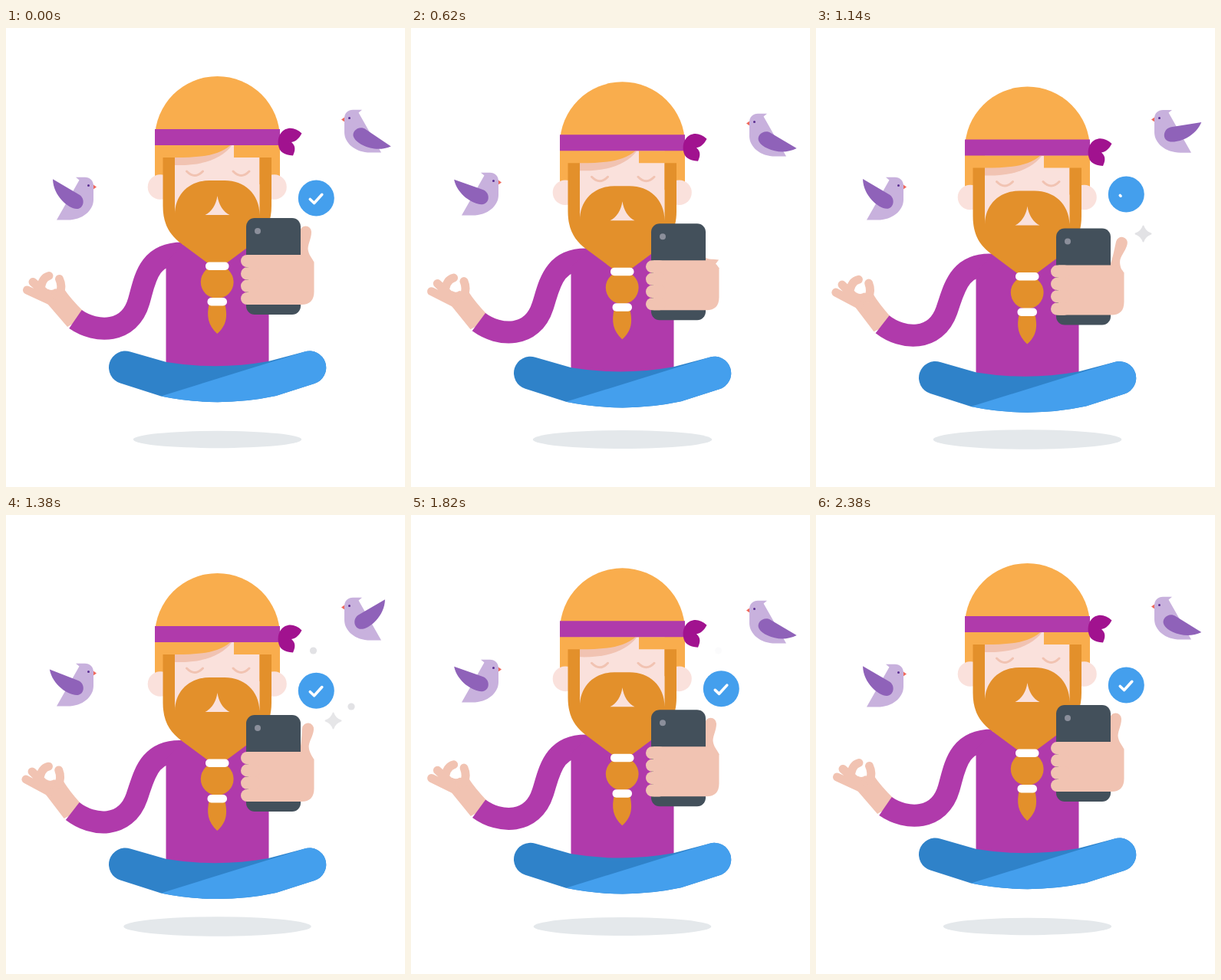
These frames come from a looping animation (520 by 599 pixels, 2.4 s). An HTML page:

```html
<!DOCTYPE html>
<html lang="en">
<head>
<meta charset="utf-8">
<title>Floating meditation</title>
<style>
  html, body { margin: 0; width: 100%; height: 100%; overflow: hidden; background: #fff; }
  svg { display: block; width: 520px; height: 599px; }
  .skin { fill: #f1c3b2; }
  .face { fill: #fae1dc; }
  .hair { fill: #f9ad4d; }
  .beard { fill: #e3902b; }
  .shirt { fill: #b03aab; }
  .white { fill: #fff; }
  .blue { fill: #449fed; }
  .line { fill: none; stroke: #f1c3b2; stroke-linecap: round; stroke-linejoin: round; }
</style>
</head>
<body>
<svg viewBox="0 0 520 599">
  <defs>
    <g id="birdBody">
      <path fill="#f0685b" d="M437 119.5L442 116V123Z"/>
      <path fill="#c8b1dd" d="M441 118C441 111 446 106.8 452 106.8H464L459.5 110.5L489 162.6H475C455 162.6 441 150 441 136Z"/>
      <circle cx="447.5" cy="117.5" r="1.5" fill="#5a2d91"/>
    </g>
    <path id="wing" fill="#8f62b9" d="M43 0L4 -8C-6 -10 -13 2 -6 8C2 15 28 16 43 0Z"/>
  </defs>

  <ellipse id="shadow" cx="275.5" cy="537" fill="#e4e8eb"/>

  <g id="leftBird"><use href="#birdBody"/><use href="#wing" class="wing"/></g>
  <g id="rightBird"><use href="#birdBody"/><use href="#wing" class="wing"/></g>

  <g fill="#e2e2e5">
    <path id="star" stroke="#e2e2e5" stroke-width="2" stroke-linejoin="round" d="M0 -10Q2.5 -2.5 10 0Q2.5 2.5 0 10Q-2.5 2.5 -10 0Q-2.5 -2.5 0 -10Z"/>
    <circle id="dotA" cx="400.5" cy="177" r="4.6"/>
    <circle id="dotB" cx="450" cy="250" r="4.6"/>
  </g>

  <g id="bubble">
    <circle r="23.5" class="blue"/>
    <path id="check" pathLength="1" fill="none" stroke="#fff" stroke-width="3.6" stroke-linecap="round" stroke-linejoin="round" d="M-8 1.5L-2.7 6.5L7.5 -4.7"/>
  </g>

  <g id="person">
    <g id="arm">
      <path class="skin" d="M80 390L55 361L46 344L57 340L76 341Q84 353 101 370L96 381Z"/>
      <circle cx="59" cy="335" r="7" class="white"/>
      <path class="line" stroke-width="11" d="M27.5 342L60 357M35 331.5L55 349M56 323.5Q46 326 45 343M69.5 327.5Q74 337 70 347"/>
      <path fill="none" stroke="#b03aab" stroke-width="29" d="M90.5 380C118 399 161 399 173 357C181 330 184 294 230 294"/>
    </g>
    <path class="shirt" d="M208.5 445V305L232 281H330V292H342.5V445Z"/>

    <path fill="#2f82c9" d="M162 422.5L209 436Q275 447 342 435L389 422.5A21.5 21.5 0 0 1 402 464L352 480Q277 496 202 480.5L149 463.5A21.5 21.5 0 0 1 162 422.5Z"/>
    <path class="blue" d="M202 480.5L389 422.5A21.5 21.5 0 0 1 402 464L352 480Q277 496 202 480.5Z"/>

    <path class="hair" d="M194 204V144.5A81.5 81.5 0 0 1 357 144.5V204Z"/>
    <g class="face">
      <circle cx="201" cy="207.5" r="16.3"/>
      <circle cx="349.5" cy="207.5" r="16.3"/>
      <path d="M220 153H330.5V250H220Z"/>
    </g>
    <path class="skin" d="M220 153H294.5C281 171 256 180 220 179Z"/>
    <path class="hair" d="M204 153H292.5C277 167 252 169 220 169H204ZM297 153H347V169H297Z"/>
    <path class="beard" d="M204.500 169H220V244C220 216 240 199 265 199H285C310 199 330.500 216 330.500 244V169H346V232C346 258 335 271 322 281L275 316L228 281C215 271 204.500 258 204.500 232Z"/>
    <path class="face" d="M275.500 219C277 230 283 240 291.500 244H259.500C268 240 274 230 275.500 219Z"/>
    <path class="line" stroke-width="3" d="M235.500 187Q246 198 256.500 187M296 187Q306.500 198 317 187"/>
    <path class="shirt" d="M194 132H357V153H194Z"/>
    <path fill="#a1128f" d="M355 153C352 133 371 123 385.500 137.500C382 144 378 148 372 149C378 154 377 160 374 166.500C362 166 356 161 355 153Z"/>

    <circle cx="275.200" cy="331.500" r="21.400" class="beard"/>
    <path class="beard" d="M265 359C261 375 263 388 275.200 399C288 388 289 375 285 359Z"/>
    <rect x="260" y="305.500" width="30.500" height="10.500" rx="5" class="white"/>
    <rect x="262.500" y="352" width="25.500" height="10.500" rx="5" class="white"/>

    <path id="thumb" class="skin" d="M381 305C384 290 383 280 383 266A7.500 7.500 0 0 1 398 266C398 275 394 280 393.500 288C394 296 399 300 401.500 306Z"/>
    <rect x="313" y="248" width="71" height="126" rx="11" fill="#43505b"/>
    <circle cx="328" cy="265" r="4" fill="#8b8f9b"/>
    <path class="skin" d="M316 296H389Q396 297 401.500 306V344Q401.500 361 385 361H316Z"/>
    <g id="fingers" class="skin"></g>
  </g>
</svg>
<script>
  const LOOP = 2400;
  const el = id => document.getElementById(id);
  const clamp = x => Math.min(1, Math.max(0, x));
  const smooth = x => { x = clamp(x); return x * x * (3 - 2 * x); };
  const ease = x => x < 0.5 ? 2 * x * x : 1 - 2 * (1 - x) ** 2;
  const pingPong = (t, period) => 1 - Math.abs((t % period) / period * 2 - 1);

  // Eased interpolation through [time, value] pairs
  function track(t, keys) {
    let [t0, v0] = keys[0];
    for (const [t1, v1] of keys) {
      if (t < t1) return v0 + (v1 - v0) * smooth((t - t0) / (t1 - t0));
      [t0, v0] = [t1, v1];
    }
    return v0;
  }

  const move = (node, transform) => node.setAttribute('transform', transform);

  for (let i = 0; i < 4; i++) {
    el('fingers').innerHTML += `<rect x="306" y="${296 + i * 16.3}" width="26" height="16.200" rx="8.100"/>`;
  }

  // Wing stays up for most of each 300 ms beat or down, depending on its phase
  function flap(bird, downAmount) {
    const angle = -42 + 64.5 * downAmount;
    move(bird.querySelector('.wing'), `translate(462 138) rotate(${angle})`);
  }

  function draw(t) {
    const sink = ease(pingPong(t, LOOP));
    move(el('person'), `translate(0 ${13.6 * sink})`);
    move(el('arm'), `rotate(${3.4 * sink} 203 310)`);
    el('shadow').setAttribute('rx', 109.7 + 13.2 * sink);
    el('shadow').setAttribute('ry', 11.2 + 1.5 * sink);

    const bob = ease(pingPong(t, LOOP / 2));
    move(el('rightBird'), `translate(0 ${5 * bob})`);
    move(el('leftBird'), `translate(555 ${88 - 6 * bob}) scale(-1 1)`);
    const beat = t % 300;
    flap(el('rightBird'), smooth((Math.abs(beat - 150) - 60) / 80));
    flap(el('leftBird'), 1 - smooth((Math.abs((beat + 50) % 300 - 150) - 20) / 80));

    const thumb = track(t, [[280, 0], [560, -55], [860, -55], [1120, 13], [1220, 13], [1500, 0]]);
    move(el('thumb'), `rotate(${thumb} 391 301)`);

    const y = track(t, [[280, 222], [500, 236], [900, 247], [1140, 217], [1500, 233.5], [2080, 222]]);
    move(el('bubble'), `translate(404.3 ${y})`);
    el('bubble').style.opacity = track(t, [[280, 1], [500, 0], [920, 0], [1100, 1]]);
    const drawn = t < 700 ? 1 : clamp((t - 1130) / 240);
    el('check').style.strokeDasharray = `${Math.max(drawn, 0.001)} 2`;
    el('check').style.visibility = t > 700 && t < 1130 ? 'hidden' : 'visible';

    const size = track(t, [[1040, 0], [1130, 1]]);
    move(el('star'), `translate(426.5 268.5) scale(${size})`);
    el('star').style.opacity = track(t, [[1040, 0], [1120, 1], [1250, 1], [1800, 0]]);
    el('dotA').style.opacity = track(t, [[1220, 0], [1340, 1], [1550, 1], [1900, 0]]);
    el('dotB').style.opacity = track(t, [[1180, 0], [1300, 1], [1440, 1], [1820, 0]]);
  }

  function frame() {
    draw(performance.now() % LOOP);
    requestAnimationFrame(frame);
  }
  frame();
</script>
</body>
</html>
```
